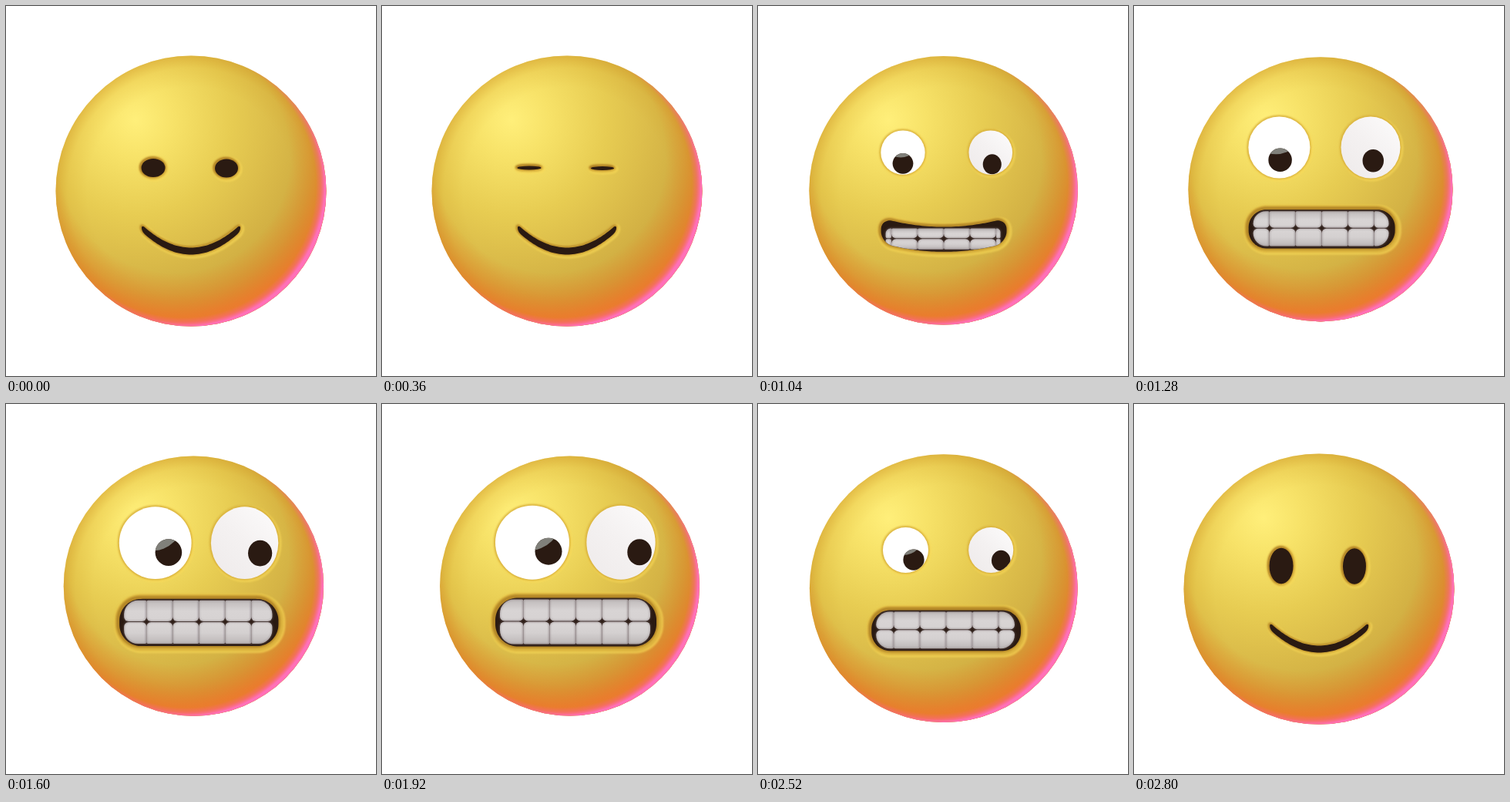
Animation of 480 by 480 pixels, one loop 2.88 s. Source, as an HTML page with a canvas:

```html
<!DOCTYPE html>
<html lang="en">
<head>
<meta charset="utf-8">
<title>Nervous smiley</title>
<style>
  html, body { margin: 0; width: 100%; height: 100%; overflow: hidden; background: #fff; }
  canvas { display: block; }
</style>
</head>
<body>
<canvas id="stage" width="480" height="480"></canvas>
<script>
const ctx = document.getElementById('stage').getContext('2d');
const LOOP = 2880, STEP = 40, DARK = '#2a1a12';

// Moments with closed lids; the eyes change kind behind two of them
const WIDEN = 840, SHRINK = 2700;
const BLINKS = [40, 360, WIDEN, SHRINK];

const clamp = v => Math.min(1, Math.max(0, v));
const mix = (a, b, u) => a + (b - a) * u;
const progress = (t, from, to) => clamp((t - from) / (to - from));
const smooth = u => u * u * (3 - 2 * u);
const easeOut = (u, power) => 1 - (1 - u) ** power;

// Lids close evenly in 80 ms and open with a soft stop
function lidOpening(t) {
  return Math.max(.1, ...[Math.min(...BLINKS.map(moment => {
    let d = t - moment;
    if (d > LOOP / 2) d -= LOOP;
    return d < 0 ? clamp(-d / 80) : easeOut(clamp(d / 120), 2);
  }))]);
}

// How far each part has moved from calm (0) to panic (1)
function panicAt(t) {
  const rise = easeOut(progress(t, WIDEN, 1900), 2.7);
  return {
    head: smooth(progress(t, 800, 1700)) - smooth(progress(t, 2160, 2680)),
    eyes: rise - smooth(progress(t, 2160, 2840)),
    gaze: smooth(progress(t, 1200, 1750)) - smooth(progress(t, 2160, LOOP)),
    mouth: rise - progress(t, 2160, 2740) ** 3.5
  };
}

function oval(x, y, rx, ry = rx) {
  const path = new Path2D();
  path.ellipse(x, y, rx, ry, 0, 0, Math.PI * 2);
  return path;
}

function fill(path, style) {
  ctx.fillStyle = style;
  ctx.fill(path);
}

function withStops(gradient, stops) {
  stops.forEach(([at, color]) => gradient.addColorStop(at, color));
  return gradient;
}

const radial = (x, y, r0, r1, ...stops) =>
  withStops(ctx.createRadialGradient(x, y, r0, x, y, r1), stops);

const linear = (x0, y0, x1, y1, ...colors) =>
  withStops(ctx.createLinearGradient(x0, y0, x1, y1),
    colors.map((color, i) => [i / (colors.length - 1), color]));

function softStroke(path, shift, width, color) {
  ctx.save();
  ctx.filter = 'blur(1.2px)';
  ctx.translate(shift, shift);
  ctx.lineWidth = width;
  ctx.strokeStyle = color;
  ctx.stroke(path);
  ctx.restore();
}

// Pressed-in rim: lit outer edge, dull groove, shade at the upper left
function emboss(path, rim, shade) {
  softStroke(path, 1, rim * 2 + 3, 'rgba(250,220,90,.65)');
  softStroke(path, 0, rim * 2, 'rgba(214,172,58,.75)');
  softStroke(path, -1, rim, `rgba(140,88,15,${shade})`);
}

function drawHead(x, y, r) {
  ctx.save();
  ctx.translate(x, y);
  ctx.scale(r / 175.5, r / 175.5);
  const ball = oval(0, 0, 175.5);
  fill(ball, radial(-72, -92, 0, 310,
    [0, '#ffef7a'], [.16, '#f7e268'], [.4, '#e7cc52'], [.7, '#d3b144'], [1, '#c09234']));
  fill(ball, radial(0, 0, 135, 176,
    [0, 'rgba(205,145,25,0)'], [.6, 'rgba(205,145,25,.12)'], [1, 'rgba(200,135,25,.4)']));
  fill(ball, radial(-22, -44, 150, 220,
    [0, 'rgba(232,130,40,0)'], [.4, 'rgba(230,126,38,.4)'], [.8, 'rgba(236,122,44,.9)'], [1, '#ee7832']));
  fill(ball, radial(-10, -8, 172, 184,
    [0, 'rgba(255,100,140,0)'], [.5, 'rgba(255,98,150,.4)'], [1, '#ff70b8']));
  ctx.restore();
}

function drawDarkEye(x, y, rx, ry) {
  const eye = oval(x, y, rx, ry);
  emboss(eye, 3, .6);
  fill(eye, DARK);
}

function drawRoundEye(x, y, rx, ry, pupil, style, gloss) {
  const white = oval(x, y, rx, ry);
  emboss(white, 1.5, .15);
  fill(white, style);
  ctx.save();
  ctx.clip(white);
  fill(pupil, DARK);
  ctx.clip(pupil);
  if (gloss) fill(gloss, '#80807a');
  ctx.restore();
}

function drawEyes(t, { head, eyes, gaze }) {
  const open = lidOpening(t);
  if (t <= WIDEN || t >= SHRINK) {
    drawDarkEye(191, 210, 15.5, 24 * open);
    drawDarkEye(286, 210.5, 15, 24 * open);
    return;
  }
  const spread = Math.sqrt(Math.max(0, eyes));
  const left = mix(188, 195, gaze), right = mix(286, 310, spread), y = mix(210, 179.7, spread);
  const r = mix(14, 48, eyes), narrow = r * mix(1, .93, head);
  const pupil = mix(12.5, 17.5, head);
  const lookX = 21 * gaze, lookY = 16.5 * clamp(eyes * 2) - 5 * gaze;

  drawRoundEye(left, y, r, r * open, oval(left + lookX, y + lookY, pupil), '#fff',
    oval(left - r * .1, y - r * .66, r * .88));
  drawRoundEye(right, y, narrow, r * open,
    oval(right + 2 + lookX * 1.05, y + lookY + 1, pupil * .9, pupil * .97),
    linear(right - r, y + r, right + r, y - r, '#eeeaea', '#f4f1f1', '#fdfcfc'));
}

// Rounded bar whose middle line follows a parabola
function barPath(x, y, w, h, bend) {
  const corner = h * .46, top = [], bottom = [], count = 80;
  for (let i = 0; i <= count; i++) {
    const u = -Math.cos(Math.PI * i / count);
    const gap = Math.max(0, corner - (1 - Math.abs(u)) * w / 2);
    const half = h / 2 - corner + Math.sqrt(Math.max(0, corner ** 2 - gap ** 2));
    const px = x + u * w / 2, py = y + bend * (.7 - u * u);
    top.push([px, py - half]);
    bottom.unshift([px, py + half]);
  }
  const path = new Path2D();
  [...top, ...bottom].forEach(p => path.lineTo(...p));
  path.closePath();
  return path;
}

function drawTooth(x0, y0, x1, y1, radii, shade) {
  if (x1 - x0 < 2 || y1 - y0 < 1) return;
  const tooth = new Path2D();
  tooth.roundRect(x0, y0, x1 - x0, y1 - y0, radii);
  fill(tooth, shade);
  softStroke(tooth, 0, 2, 'rgba(120,108,112,.4)');
}

function drawTeeth(x, y, w, h) {
  const pitch = 34, perSide = 3, left = x - w / 2 + 6, right = x + w / 2 - 8;
  const top = y - h / 2 + 2, seam = y - 1, bottom = y + h / 2 - 3;
  const upper = linear(0, top, 0, seam, '#bfbaba', '#d8d4d4', '#d6d2d2');
  const lower = linear(0, seam, 0, bottom, '#dad6d6', '#d4d0d0', '#bcb7b7');
  for (let i = -perSide; i < perSide; i++) {
    const first = i === -perSide, last = i === perSide - 1;
    const x0 = first ? left : x + i * pitch, x1 = last ? right : x + (i + 1) * pitch;
    const endL = first ? 18 : 2, endR = last ? 18 : 2;
    drawTooth(x0, top, x1, seam - .5, [endL, endR, 6, 6], upper);
    drawTooth(x0, seam + .5, x1, bottom, [6, 6, endR, endL], lower);
  }
}

function drawMouth({ head, gaze, mouth }) {
  const x = 240 + 6 * head + 5.5 * gaze, y = mix(297, 283, head);
  const w = mix(128, 209, mouth), h = mix(9, 63, mouth);
  const bend = 30 * (1 - smooth(clamp(mouth / .75)));
  const path = barPath(x, y, w, h, bend);
  emboss(path, mix(2.5, 6.5, mouth), .5);
  fill(path, DARK);
  if (h < 16) return;
  ctx.save();
  ctx.clip(path);
  drawTeeth(x, y + bend * .7, w, h);
  ctx.restore();
}

function draw(t) {
  const panic = panicAt(t);
  const rebound = Math.sin(Math.PI * progress(t, 2540, 2760));
  ctx.fillStyle = '#fff';
  ctx.fillRect(0, 0, 480, 480);
  drawHead(mix(240, 243.5, panic.head) + rebound, mix(240, 236, panic.head) + rebound,
    mix(175.5, 168.4, panic.head) + rebound);
  drawEyes(t, panic);
  drawMouth(panic);
}

const start = performance.now();
function tick() {
  const t = (performance.now() - start) % LOOP;
  draw(Math.floor(t / STEP) * STEP);
  requestAnimationFrame(tick);
}
tick();
</script>
</body>
</html>
```
